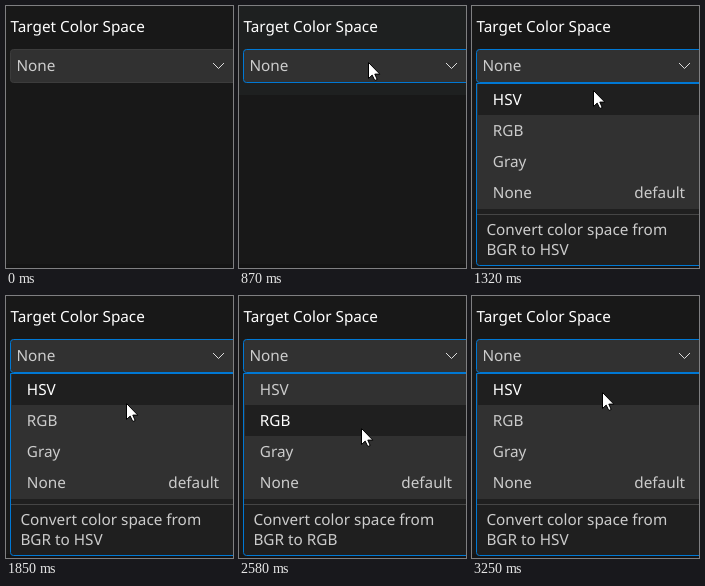
Recreate the animation shown at these times as an HTML page with a canvas. Size 227 by 262 pixels, loop 3810 ms.

```html
<!DOCTYPE html>
<html lang="en">
<head>
<meta charset="utf-8">
<title>Color space dropdown</title>
<style>
  html, body { margin: 0; height: 100%; overflow: hidden; background: #181818; }
  canvas { display: block; }
</style>
</head>
<body>
<canvas id="stage" width="227" height="262"></canvas>
<script>
const ctx = document.getElementById('stage').getContext('2d');
const LOOP = 3810, STEP = 65, ENTER = 130, HOVER = 590, FOCUS = 870, OPEN = 990;
const BLUE = '#0078d4', PANEL = '#313131', DARK = '#1f1f1f', TEXT = '#cccccc', WHITE = '#ffffff';
const ITEMS = ['HSV', 'RGB', 'Gray', 'None'];
const MENU_TOP = 78, ROW_H = 31.4;

// Straight pointer strokes, sampled every STEP ms
const STROKES = [
  { from: ENTER, to: 520, x: 135, y: 65 },
  { from: HOVER, to: 650, x: 129, y: 56 },
  { from: 1250, to: 1320, x: 121, y: 84 },
  { from: 1380, to: 1650, x: 120, y: 101 },
  { from: 1850, to: 2110, x: 120, y: 133 },
  { from: 2270, to: 2380, x: 120, y: 137 },
  { from: 2580, to: 2910, x: 130, y: 109 },
  { from: 3120, to: 3250, x: 130, y: 96 }
];

function pointerAt(time) {
  let x = 206, y = 259;
  for (const s of STROKES) {
    if (time < s.from) break;
    const steps = Math.round((s.to - s.from) / STEP) + 1;
    const p = Math.min(1, (Math.floor((time - s.from) / STEP) + 1) / steps);
    x += (s.x - x) * p;
    y += (s.y - y) * p;
  }
  return { x: Math.round(x), y: Math.round(y) };
}

function rect(x, y, w, h, color) {
  ctx.fillStyle = color;
  ctx.fillRect(x, y, w, h);
}

function stroke(color) {
  ctx.lineWidth = 1;
  ctx.strokeStyle = color;
  ctx.stroke();
}

// The right edge lies outside the stage
function box(top, bottom, radii, fill, border) {
  ctx.beginPath();
  ctx.roundRect(4.5, top + .5, 240, bottom - top - 1, radii);
  ctx.fillStyle = fill;
  ctx.fill();
  stroke(border);
}

function label(text, x, y, color = TEXT) {
  ctx.fillStyle = color;
  ctx.fillText(text, x, y);
}

function path(points, dx = 0, dy = 0) {
  ctx.beginPath();
  for (const [x, y] of points) ctx.lineTo(x + dx, y + dy);
}

function drawSelect(focused) {
  box(43, 77, 3, PANEL, focused ? BLUE : '#3c3c3c');
  label('None', 10.4, 65);
  path([[207, 57], [212.5, 62.5], [218, 57]]);
  stroke('#dddddd');
}

function drawMenu(row) {
  const described = row < 3;
  box(77, described ? 260 : 204, [0, 0, 3, 3], DARK, BLUE);
  rect(5, MENU_TOP, 222, 125, PANEL);
  rect(6, Math.round(MENU_TOP + row * ROW_H), 221, 31, DARK);
  ITEMS.forEach((name, i) => {
    const y = Math.floor(99 + i * ROW_H - i * .1), color = i === row ? WHITE : TEXT;
    label(name, 20.8, y, color);
    if (i === 3) label('default', 162.3, y, color);
  });
  if (described) {
    rect(5, 208, 222, 1, '#454545');
    label('Convert color space from', 14.4, 229);
    label('BGR to ' + ITEMS[row], 14.4, 249);
  }
}

function drawPointer({ x, y }) {
  path([[0, 0], [0, 16], [3.7, 12.6], [6.3, 18], [8.7, 17], [6.3, 11.6], [11.3, 11.6]], x + .5, y + .5);
  ctx.closePath();
  ctx.fillStyle = WHITE;
  ctx.fill();
  stroke('#000000');
}

function draw(time) {
  const pointer = pointerAt(time);
  const inMenu = pointer.y >= MENU_TOP;
  rect(0, 0, 227, 262, '#181818');
  rect(0, 258, 227, 4, '#141414');
  if (time >= HOVER && !inMenu) rect(0, 0, 227, 89, '#1e2020');
  ctx.font = '15.3px "Noto Sans", "Open Sans", sans-serif';
  ctx.textRendering = 'geometricPrecision';
  label('Target Color Space', 4.5, 26, WHITE);
  drawSelect(time >= FOCUS);
  if (time >= OPEN) drawMenu(inMenu ? Math.floor((pointer.y - MENU_TOP) / ROW_H) : 3);
  if (time >= ENTER) drawPointer(pointer);
}

const begin = performance.now();
function tick() {
  draw((performance.now() - begin) % LOOP);
  requestAnimationFrame(tick);
}
tick();
</script>
</body>
</html>
```
